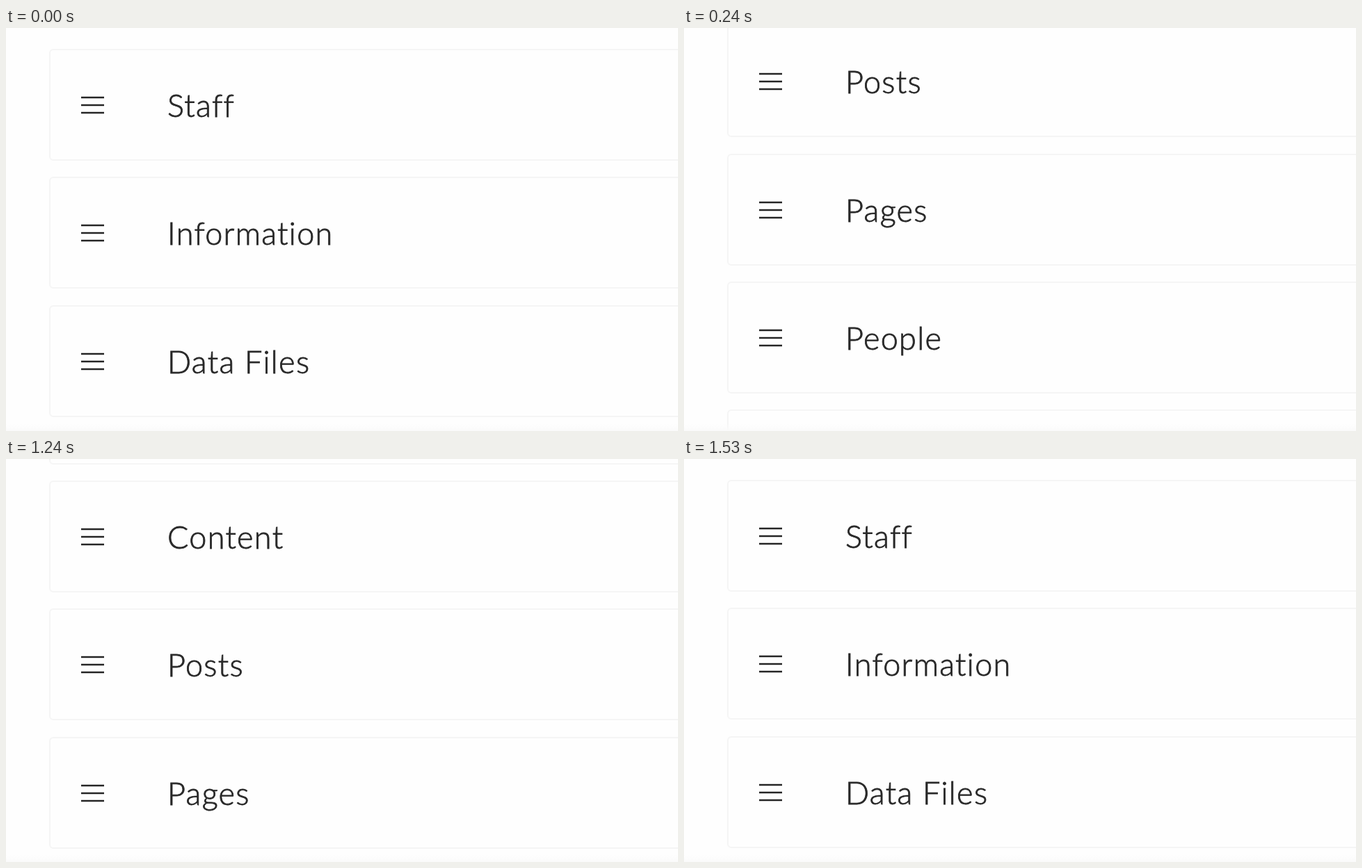
Write an HTML page that moves like this. It is 966x580 px and loops after 5470 ms.

```html
<!DOCTYPE html>
<html lang="en">
<head>
<meta charset="utf-8">
<title>Scrolling list</title>
<style>
  html, body { margin: 0; width: 100%; height: 100%; overflow: hidden; background: #fefefe; }
  #stage { position: relative; width: 966px; height: 580px; overflow: hidden; }
  #stage::after {
    content: ""; position: absolute; left: 0; right: 0; bottom: 0; height: 10px;
    background: linear-gradient(#fafafa00, #fafafa);
  }
  .row {
    position: absolute; left: 62px; width: 940px; height: 161px; box-sizing: border-box;
    border: 2.5px solid #f5f5f5; border-radius: 6px;
  }
  svg { position: absolute; left: 44px; top: 65px; }
  .label {
    position: absolute; left: 168px; top: 52px; white-space: pre;
    font: 300 45px/54px Lato, sans-serif; letter-spacing: 1.3px; color: #282828;
    -webkit-text-stroke: .8px #282828;
  }
</style>
</head>
<body>
<div id="stage"><div id="list"></div></div>
<script>
const LOOP = 5470, PITCH = 184.3, FIRST_TOP = 30, BOTTOM = 771;
const labels = ["Staff", "Information", "Data Files", "Content", "Posts", "Pages", "People", ""];

const list = document.getElementById("list");
list.innerHTML = labels.map((label, i) => `
  <div class="row" style="top:${Math.round(FIRST_TOP + i * PITCH)}px">
    <svg width="33" height="28"><path d="M0 3H33M0 14H33M0 25H33" stroke="#252525" stroke-width="2.5"/></svg>
    <span class="label">${label}</span>
  </div>`).join("");

const clamp = x => Math.min(1, Math.max(0, x));
const smooth = p => p * p * (3 - 2 * p);

// A quick eased flick down, in 60 ms ticks
const flickDown = t => BOTTOM * smooth(clamp((Math.floor(t / 60) * 60 - 108) / 115));

// A steady drag back up in 58 ms ticks, then a fast finish
function dragUp(t) {
  const tick = Math.floor((t - 1060) / 58);
  return tick < 7 ? 724 - 57.5 * tick : Math.max(0, 190 * (8 - tick));
}

function draw() {
  const t = performance.now() % LOOP;
  const scroll = t < 1060 ? flickDown(t) : dragUp(t);
  list.style.transform = `translateY(${-Math.round(scroll)}px)`;
  requestAnimationFrame(draw);
}
draw();
</script>
</body>
</html>
```
